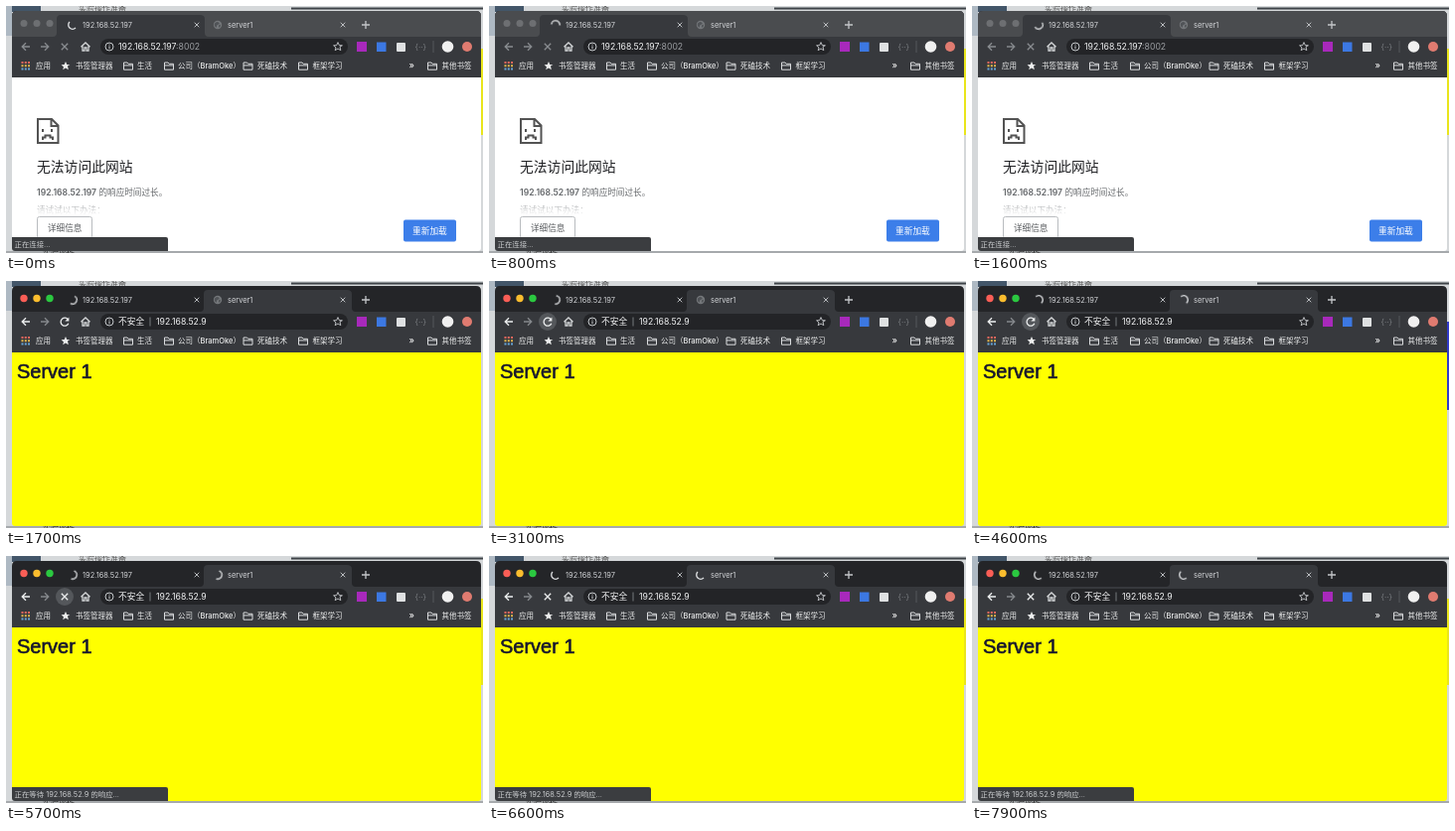
These frames come from a looping animation (480 px wide and 249 px high, 8 s). An HTML page:

```html
<!DOCTYPE html>
<html lang="zh-CN">
<head>
<meta charset="utf-8">
<title>Browser reload</title>
<style>
  html, body { margin: 0; width: 100%; height: 100%; overflow: hidden; background: #d5d8da; }
  svg { display: block; width: 100vw; height: 100vh; }
  text { font-family: Inter, "Noto Sans CJK SC", "Noto Sans CJK", sans-serif; white-space: pre; }
  .tab { font-size: 7.45px; fill: #d3d5d8; }
  .url { font-size: 8.7px; fill: #f1f2f3; }
  .mark { font-size: 7.5px; font-weight: 500; fill: #eceded; }
  .status { font-size: 7.4px; fill: #c9cbcd; }
  .line { fill: none; stroke: currentColor; stroke-width: 1.3; }

  .before, .after, .idle, .busy, .hover, .reload, .stop, .blue, .yellow {
    animation: 8s step-end infinite;
  }
  .before { animation-name: before; }
  .after { animation-name: after; }
  .hover { animation-name: hover; }
  .idle { animation-name: idle; }
  .busy { animation-name: busy; }
  .reload { animation-name: reload; }
  .stop { animation-name: stop; }
  .blue { animation-name: blue; }
  .yellow { animation-name: yellow; }
  .spin { animation: spin 8s steps(80) infinite; }

  @keyframes before { 0% { opacity: 1 } 21.25%, 100% { opacity: 0 } }
  @keyframes after { 0% { opacity: 0 } 21.25%, 100% { opacity: 1 } }
  @keyframes hover { 0% { opacity: 0 } 36.25% { opacity: 1 } 81.25%, 100% { opacity: 0 } }
  @keyframes idle { 0% { opacity: 1 } 56.25%, 100% { opacity: 0 } }
  @keyframes busy { 0% { opacity: 0 } 56.25%, 100% { opacity: 1 } }
  @keyframes reload { 0% { opacity: 0 } 21.25% { opacity: 1 } 65%, 100% { opacity: 0 } }
  @keyframes stop { 0% { opacity: 0 } 65%, 100% { opacity: 1 } }
  @keyframes blue { 0% { opacity: 0 } 46.25% { opacity: 1 } 62.5%, 100% { opacity: 0 } }
  @keyframes yellow { 0% { opacity: 1 } 21.25% { opacity: 0 } 62.5%, 100% { opacity: 1 } }
  /* one counter-clockwise turn per 1320 ms */
  @keyframes spin { to { transform: rotate(-2182deg) } }
</style>
</head>
<body>
<svg viewBox="0 0 480 249" preserveAspectRatio="none">
  <defs>
    <clipPath id="frame"><path d="M6 10q0-5 5-5H473q5 0 5 5V244q0 3-3 3H9q-3 0-3-3z"/></clipPath>
    <linearGradient id="fade" x2="0" y2="1">
      <stop offset="0" stop-color="#fff" stop-opacity=".25"/>
      <stop offset="1" stop-color="#fff"/>
    </linearGradient>
    <g id="folder" class="line" style="stroke-width:1">
      <path d="M-4.5 3.7V-3.5H-1L.2-2.2H4.5V3.7zM-4.5-.6H4.5"/>
    </g>
    <path id="star" d="M0-4.4 1.3-1.4 4.4-1.2 2-.1 2.8 3.7 0 2-2.8 3.7-2 .9-4.4-1.2-1.3-1.4z"/>
    <path id="cross" class="line" d="M-3.2-3.2 3.2 3.2M3.2-3.2-3.2 3.2"/>
    <path id="back" class="line" d="M4 0H-3.6M0-3.8-3.8 0 0 3.8"/>
    <path id="shape" d="M47 31q4 0 4-4V13q0-4 4-4H195q5 0 5 4V27q0 4 4 4z"/>
    <path id="arc" class="line" d="M-3-3A4.2 4.2 0 0 0 3 3"/>
    <g id="globe">
      <circle r="4.2" fill="#74777a"/>
      <path d="M-3-1.5Q-1-4 1-2.6T-.6.2L-1.4 2.8Q-4 1-3-1.5M1 .6 3.2-.4Q3 2.6 1 2.8z" fill="#505357"/>
    </g>
  </defs>

  <!-- desktop behind the window -->
  <rect width="480" height="249" fill="#d5d8da"/>
  <rect width="35" height="6" fill="#435669"/>
  <rect width="6" height="30" fill="#aeb9c3"/>
  <text x="73" y="5.2" font-size="8" fill="#555">实验操作准备</text>
  <path d="M287 2.5H480" stroke="#3d4247" stroke-width="2"/>
  <path d="M0 248H480" stroke="#777b7e" stroke-width="1"/>
  <text x="37" y="252" font-size="8" fill="#222">实验操作</text>
  <rect class="yellow" x="477" y="43" width="3" height="87" fill="#e9e51c"/>
  <rect class="blue" x="477" y="41" width="3" height="89" fill="#3039c8"/>

  <g clip-path="url(#frame)">
    <rect x="6" y="5" width="472" height="27" fill="#242528"/>
    <g class="before">
      <rect x="6" y="5" width="472" height="27" fill="#4a4c4f"/>
      <g fill="#6d6f72">
        <circle cx="18" cy="17.5" r="3.5"/><circle cx="31" cy="17.5" r="3.5"/><circle cx="44" cy="17.5" r="3.5"/>
      </g>
      <use href="#shape" fill="#37393d"/>
    </g>
    <g class="after">
      <circle cx="18" cy="17.5" r="3.7" fill="#fa5e56"/>
      <circle cx="31" cy="17.5" r="3.7" fill="#fbbd2e"/>
      <circle cx="44" cy="17.5" r="3.7" fill="#2bc840"/>
      <use href="#shape" x="148" fill="#37393d"/>
    </g>

    <!-- tabs -->
    <g color="#e1e3e5" transform="translate(67 19)"><g class="spin"><use href="#arc"/></g></g>
    <text class="tab" x="77" y="22">192.168.52.197</text>
    <g class="idle"><use href="#globe" x="213" y="19"/></g>
    <g class="busy" color="#e1e3e5">
      <g transform="translate(213 19)"><g class="spin"><use href="#arc"/></g></g>
    </g>
    <text class="tab" x="223" y="22">server1</text>
    <g color="#c4c6c9">
      <use href="#cross" transform="translate(192 19) scale(.72)"/>
      <use href="#cross" transform="translate(339 19) scale(.72)"/>
      <path class="line" d="M358 19H366M362 15V23"/>
    </g>

    <!-- toolbar -->
    <rect x="6" y="31" width="472" height="41" fill="#37393d"/>
    <rect x="95" y="33" width="249" height="16" rx="8" fill="#232427"/>
    <g class="before" color="#898c90">
      <use href="#back" x="20" y="41"/>
      <use href="#cross" x="59" y="41"/>
    </g>
    <g class="after" color="#eceeef"><use href="#back" x="20" y="41"/></g>
    <g color="#85888c"><use href="#back" transform="translate(39 41) scale(-1 1)"/></g>
    <circle class="hover" cx="59" cy="41" r="9" fill="#54575b"/>
    <g class="reload" color="#eceeef">
      <path class="line" d="M62.6 39.2A4 4 0 1 0 62.8 42.7"/>
      <path d="M63.4 36.6V40.6H59.4z" fill="currentColor"/>
    </g>
    <g class="stop" color="#eceeef"><use href="#cross" x="59" y="41"/></g>
    <path class="line" color="#d2d4d6" d="M75.5 41.2 80 37 84.5 41.2M77 40.5V45H79V42H81V45H83V40.5"/>
    <g color="#c5c8cb">
      <circle class="line" cx="104" cy="41" r="4" style="stroke-width:1"/>
      <path class="line" d="M104 40.4V43.3M104 38.5V39.5" style="stroke-width:1"/>
    </g>
    <g class="before">
      <text class="url" x="113" y="44.2">192.168.52.197<tspan fill="#9b9ea2">:8002</tspan></text>
    </g>
    <g class="after">
      <text class="url" x="113" y="44.2">不安全</text>
      <path d="M145 36.5V45.5" stroke="#777a7e"/>
      <text class="url" x="151" y="44.2">192.168.52.9</text>
    </g>
    <use href="#star" x="334" y="41" fill="none" stroke="#c8cacd" stroke-width=".9"/>
    <rect x="353" y="36" width="10" height="10" fill="#a829bb"/>
    <rect x="373" y="36.5" width="9.5" height="9.5" fill="#3c78e2"/>
    <rect x="393" y="37" width="9" height="9" rx="1" fill="#dfe1e2"/>
    <text x="411.5" y="44" font-size="8" fill="#7b7e82">{··}</text>
    <path d="M430 35V47" stroke="#55585c"/>
    <circle cx="444.5" cy="41" r="5.8" fill="#f0f0f0"/>
    <circle cx="464" cy="41" r="5" fill="#e07b70"/>

    <!-- bookmarks -->
    <g stroke-width="2" stroke-dasharray="2 1.3">
      <path d="M15.5 57H24" stroke="#e8685d"/>
      <path d="M15.5 60.3H24" stroke="#e5b94d"/>
      <path d="M15.5 63.6H24" stroke="#69a9dd"/>
    </g>
    <use href="#star" x="60" y="60.5" fill="#eceded"/>
    <g color="#d9dbdd">
      <use href="#folder" x="123" y="60.5"/><use href="#folder" x="164" y="60.5"/>
      <use href="#folder" x="243.5" y="60.5"/><use href="#folder" x="299" y="60.5"/>
      <use href="#folder" x="429" y="60.5"/>
    </g>
    <g class="mark">
      <text x="30" y="63.3">应用</text>
      <text x="70" y="63.3">书签管理器</text>
      <text x="132" y="63.3">生活</text>
      <text x="173" y="63.3">公司（BramOke）</text>
      <text x="253" y="63.3">死磕技术</text>
      <text x="308.5" y="63.3">框架学习</text>
      <text x="405.5" y="63.3" font-size="9">»</text>
      <text x="438.5" y="63.3">其他书签</text>
    </g>

    <!-- pages -->
    <g class="before">
      <rect x="6" y="72" width="472" height="175" fill="#fff"/>
      <g fill="none" stroke="#535353" stroke-width="2">
        <path d="M32 114H46L52.5 120.5V138H32zM45.5 114V121H52.5"/>
        <path d="M37 124V127M46 124V127M37 135V132.5H39.5V130.5H44.5V132.5H47V135"/>
      </g>
      <text x="31" y="166.5" font-size="13.8" font-weight="500" fill="#202124">无法访问此网站</text>
      <text x="31" y="190.5" font-size="8.6" fill="#64676a"><tspan font-weight="600">192.168.52.197</tspan> 的响应时间过长。</text>
      <text x="31" y="208.5" font-size="8.6" fill="#85888b">请试试以下办法：</text>
      <rect x="29" y="199" width="80" height="12" fill="url(#fade)"/>
      <rect x="31.5" y="212.5" width="55" height="22" rx="2" fill="#fff" stroke="#b9bcbf"/>
      <text x="42" y="226.7" font-size="8.6" fill="#55585b">详细信息</text>
      <rect x="400" y="215.5" width="53" height="22" rx="2" fill="#3c7ee9"/>
      <text x="409" y="229.8" font-size="8.7" font-weight="500" fill="#fff">重新加载</text>
      <path d="M6 233H161q2 0 2 2V247H6z" fill="#3b3d40"/>
      <text class="status" x="8.5" y="242.7">正在连接...</text>
    </g>
    <g class="after">
      <rect x="6" y="72" width="472" height="175" fill="#ff0"/>
      <text x="11" y="98" fill="#17172e" stroke="#17172e" stroke-width=".6"
        style="font:20px 'Liberation Sans', Arial, sans-serif">Server 1</text>
    </g>
    <g class="stop">
      <path d="M6 233H161q2 0 2 2V247H6z" fill="#3b3d40"/>
      <text class="status" x="8.5" y="242.7">正在等待 192.168.52.9 的响应...</text>
    </g>
  </g>
</svg>
</body>
</html>
```
